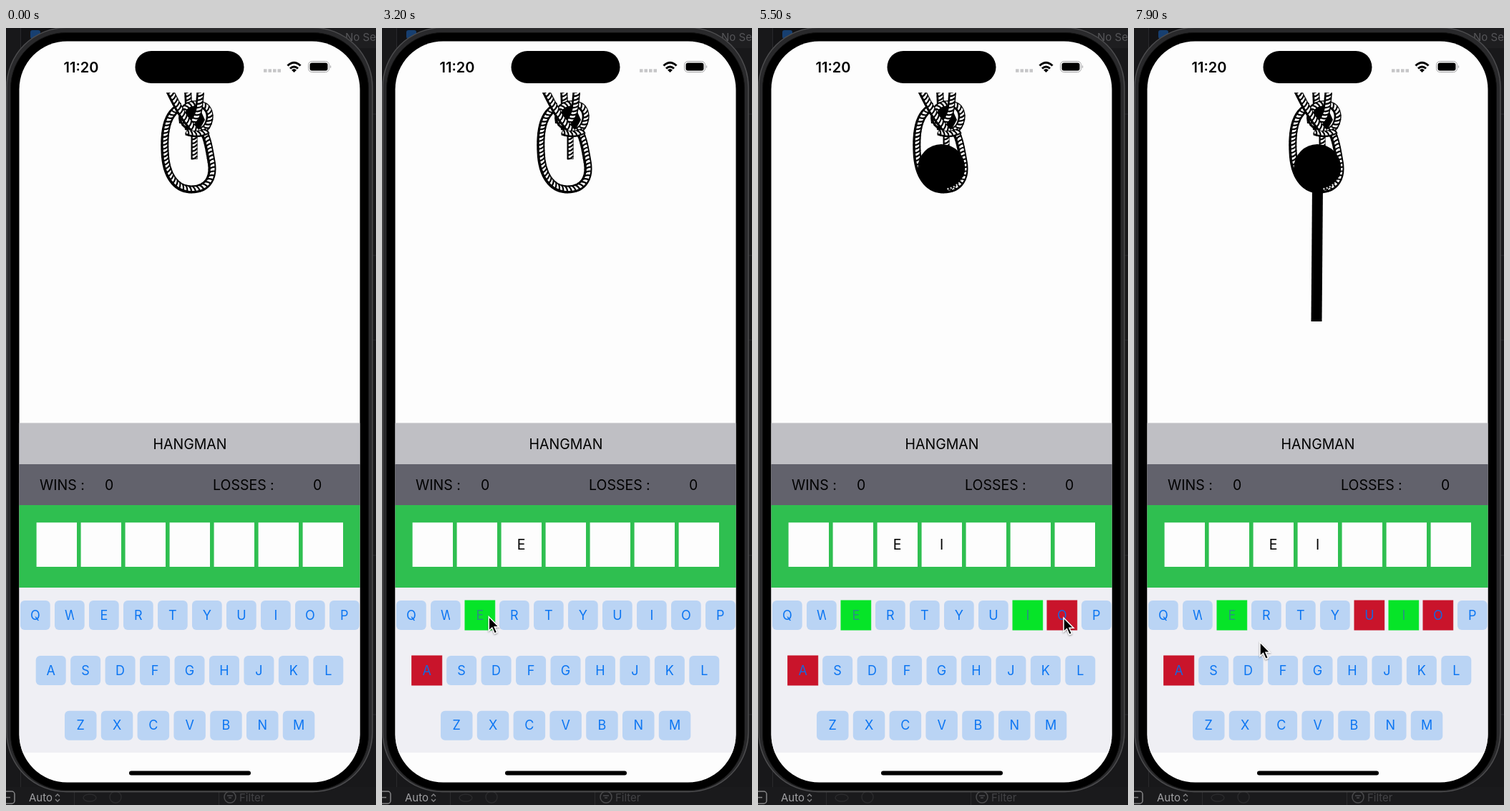
An HTML page for the animation above (8000 ms loop, 517 px wide and 1083 px high).

```html
<!DOCTYPE html>
<html>
<head>
<meta charset="utf-8">
<style>
  html, body { margin: 0; width: 100%; height: 100%; overflow: hidden; background: #18181a; }
  svg { display: block; width: 100%; height: 100%; }
  text { font-family: Inter, Roboto, sans-serif; font-size: 19.5px; }
  .key { font-size: 18px; fill: #0b75f2; }
  .mid { text-anchor: middle; }
</style>
</head>
<body>
<svg viewBox="0 0 517 1083">
  <defs>
    <clipPath id="screen"><rect x="18.500" y="18.500" width="476" height="1033" rx="67"/></clipPath>
    <clipPath id="ropeTop"><rect x="200" y="90" width="110" height="150"/></clipPath>
    <clipPath id="wClip"><rect x="70" y="800" width="25" height="40"/></clipPath>
  </defs>

  <!-- desktop behind the phone -->
  <rect width="517" height="1083" fill="#18181a"/>
  <rect x="20" width="386" height="28" fill="#131315"/>
  <rect x="406" width="111" height="28" fill="#1e1e20"/>
  <rect x="34" y="3" width="14" height="12" rx="3" fill="#173f70"/>
  <path d="M20.500 0V1083M0 117H20M512 120H517M512 317H517M512 435H517M512 735H517M0 957H20M512 957H517" stroke="#29292c"/>
  <text x="474" y="18" style="font-size:15px" fill="#555558">No Se</text>
  <rect y="1058" width="517" height="25" fill="#1a1a1c"/>
  <path d="M95.500 1062V1083M297.500 1062V1083" stroke="#2c2c2e"/>
  <rect x="-8" y="1064" width="20" height="17" rx="4" fill="none" stroke="#858587" stroke-width="1.500"/>
  <path d="M0 1072.500H6" stroke="#858587" stroke-width="1.500"/>
  <text x="32" y="1078" style="font-size:15px" fill="#a0a0a3">Auto</text>
  <path d="M69 1071l3 -3 3 3M69 1075l3 3 3 -3" fill="none" stroke="#858587" stroke-width="1.300"/>
  <g fill="none" stroke="#2a2a2c" stroke-width="1.500">
    <ellipse cx="117" cy="1073" rx="9" ry="5"/><circle cx="153" cy="1072" r="8"/>
    <circle cx="313" cy="1072" r="8" stroke="#4a4a4c"/><path d="M309 1070H317M311 1073H315" stroke="#4a4a4c"/>
  </g>
  <text x="326" y="1078" style="font-size:15px" fill="#434346">Filter</text>

  <!-- phone -->
  <rect x="1" y="-.500" width="511" height="1065" rx="83" fill="#29292b" stroke="#4c4c4e" stroke-width="1.500"/>
  <rect x="6.500" y="6.500" width="500" height="1056" rx="78" fill="#000" stroke="#111"/>
  <g clip-path="url(#screen)">
    <rect width="517" height="1083" fill="#fdfdfd"/>
    <rect y="550.500" width="517" height="58" fill="#bfbfc4"/>
    <rect y="608" width="517" height="57.500" fill="#62626c"/>
    <rect y="665" width="517" height="115" fill="#2fbf50"/>
    <rect y="780" width="517" height="230" fill="#efeff4"/>
  </g>
  <rect x="180.500" y="32" width="152" height="45" rx="22.500"/>
  <text class="mid" x="105" y="61.500" style="font-size:20px;font-weight:600">11:20</text>
  <path d="M360 59.500H384" stroke="#c6c6c8" stroke-width="4.500" stroke-dasharray="4.500 2"/>
  <path d="M393.500 52.500Q402.500 44 411.500 52.500M397 56.500Q402.500 51.500 408 56.500" fill="none" stroke="#000" stroke-width="3"/>
  <path d="M399 58.500Q402.500 55.500 406 58.500L402.500 62Z"/>
  <rect x="422.500" y="46.500" width="29" height="15" rx="5" fill="none" stroke="#a4a4a6"/>
  <rect x="424.500" y="48.500" width="25" height="11" rx="3"/>
  <path d="M453 51.500Q455.500 54 453 56.500Z" fill="#a4a4a6"/>
  <rect x="172" y="1035.500" width="170" height="6" rx="3"/>

  <g id="rope" clip-path="url(#ropeTop)"></g>
  <g id="head"><circle cx="256.300" cy="195" r="33"/>
    <path d="M287 208Q280 222 262 225" fill="none" stroke="#ddd" stroke-width="2.500" stroke-dasharray="2 2.500"/></g>
  <path id="torso" d="M249 220H264L262.500 409H247.500Z"/>

  <text class="mid" x="257" y="586.500">HANGMAN</text>
  <text x="47" y="644">WINS :</text><text x="138" y="644">0</text>
  <text x="289" y="644">LOSSES :</text><text x="429" y="644">0</text>
  <g id="slots"></g>
  <g id="keys"></g>
  <path id="cursor" d="M0 0V19.500L4.500 15.500 8 23.500 11.500 22 8 14.200H14Z" stroke="#fff" stroke-width="1.500"
    style="filter:drop-shadow(0 1px 1px #0006)"/>
</svg>
<script>
const el = id => document.getElementById(id);

function add(parent, tag, attrs, text = '') {
  const node = document.createElementNS('http://www.w3.org/2000/svg', tag);
  for (const name in attrs) node.setAttribute(name, attrs[name]);
  node.textContent = text;
  return parent.appendChild(node);
}

// A strand: black edge, white core lit from the upper right, slanted ticks along its length
function strand(d, width, core) {
  const line = { d, fill: 'none' }, rope = el('rope');
  const path = add(rope, 'path', { ...line, stroke: '#000', 'stroke-width': width });
  add(rope, 'path', { ...line, stroke: '#fdfdfd', 'stroke-width': core, transform: 'translate(.7 -.7)' });
  let ticks = '';
  for (let s = 2; s < path.getTotalLength(); s += 5.4) {
    const p = path.getPointAtLength(s), q = path.getPointAtLength(s + 0.5);
    const a = Math.atan2(q.y - p.y, q.x - p.x), c = Math.cos(a), n = Math.sin(a), h = width / 2 - 0.5;
    const at = (u, v) => `${p.x + u * c - v * n} ${p.y + u * n + v * c}`;
    ticks += `M${at(-2, -h)}Q${at(2.5, -1)} ${at(2, h)}`;
  }
  add(rope, 'path', { d: ticks, fill: 'none', stroke: '#000', 'stroke-width': 2.2 });
}
strand('M263 146V183', 9, 6);
strand('M246 109C222 118 221 150 222 172C223 205 237 225 259 225C283 225 291 207 287 186C284 170 283 158 277 146', 11, 5.6);
add(el('rope'), 'path', { d: 'M246 112L268 106 278 128 268 146 250 142Z' });
strand('M254 86L255 108', 10, 6);
strand('M247 132C243 112 254 106 266 106C284 106 287 121 283 132C279 144 266 149 252 143', 10, 6);
strand('M272 86C270 105 271 118 262 130C256 138 250 137 247 126', 10.5, 6.4);
strand('M228 86C238 106 246 124 266 145', 11, 6.8);
strand('M252 145Q266 151 281 144', 9, 5.5);

const slots = Array.from({ length: 7 }, (_, i) => {
  add(el('slots'), 'rect', { x: 42.6 + 62 * i, y: 689.3, width: 56.4, height: 61.7, fill: '#fdfdfd' });
  return add(el('slots'), 'text', { class: 'mid', x: 70.6 + 62 * i, y: 727 });
});

const keys = {};
[['QWERTYUIOP', 20, 798, 48, 41.7], ['ASDFGHJKL', 41.7, 875, 48.45, 42], ['ZXCVBNM', 82, 951.7, 50.8, 44.5]]
  .forEach(([row, x, y, step, width]) => [...row].forEach((letter, i) => {
    const left = x + i * step;
    const box = add(el('keys'), 'rect', { x: left, y, width, height: 41 });
    const cut = letter === 'W' ? { 'clip-path': 'url(#wClip)' } : {};
    const label = add(el('keys'), 'text',
      { class: 'key mid', x: left + width / 2 + (cut['clip-path'] ? 2 : 0), y: y + 26.5, ...cut }, letter);
    keys[letter] = { box, label };
  }));

function paintKey({ box, label }, fill, ink, radius) {
  box.setAttribute('fill', fill);
  box.setAttribute('stroke', radius ? 'none' : fill);
  box.setAttribute('rx', radius);
  label.style.fill = ink;
}

// letter, time pressed, slot it fills (-1 for a miss)
const presses = [['A', 1400, -1], ['E', 3000, 2], ['I', 3900, 3], ['O', 5200, -1], ['U', 7000, -1]];
// time, x, y of the pointer
const route = [[400, 22, 1030], [900, 52, 894], [1500, 52, 894], [2300, 214, 832], [2800, 132, 821], [3100, 132, 821],
  [3700, 365, 815], [4200, 365, 815], [4800, 427, 822], [5700, 427, 822], [6300, 329, 826], [7100, 329, 826], [7900, 176, 856]];

function pointer(t) {
  const i = Math.max(1, route.findIndex(p => p[0] >= t));
  const [t0, x0, y0] = route[i - 1], [t1, x1, y1] = route[i];
  const u = Math.min(1, Math.max(0, (t - t0) / (t1 - t0))), e = u * u * (3 - 2 * u);
  return [x0 + (x1 - x0) * e, y0 + (y1 - y0) * e];
}

const show = (node, on) => node.style.visibility = on ? 'visible' : 'hidden';

function render(now) {
  const t = Math.floor(now % 8000 / 100) * 100;
  for (const key of Object.values(keys)) paintKey(key, '#bad4f4', '', 6);
  slots.forEach(slot => slot.textContent = '');
  let misses = 0;
  for (const [letter, time, slot] of presses) {
    if (t < time) continue;
    const hit = slot >= 0;
    paintKey(keys[letter], hit ? '#06e428' : '#c9142b', hit ? '#2b8f86' : '#1767df', 0);
    if (hit) slots[slot].textContent = letter; else misses++;
  }
  show(el('head'), misses > 1);
  show(el('torso'), misses > 2);
  show(el('cursor'), t >= route[0][0]);
  el('cursor').setAttribute('transform', `translate(${pointer(t)})`);
  requestAnimationFrame(render);
}
render(performance.now());
</script>
</body>
</html>
```
